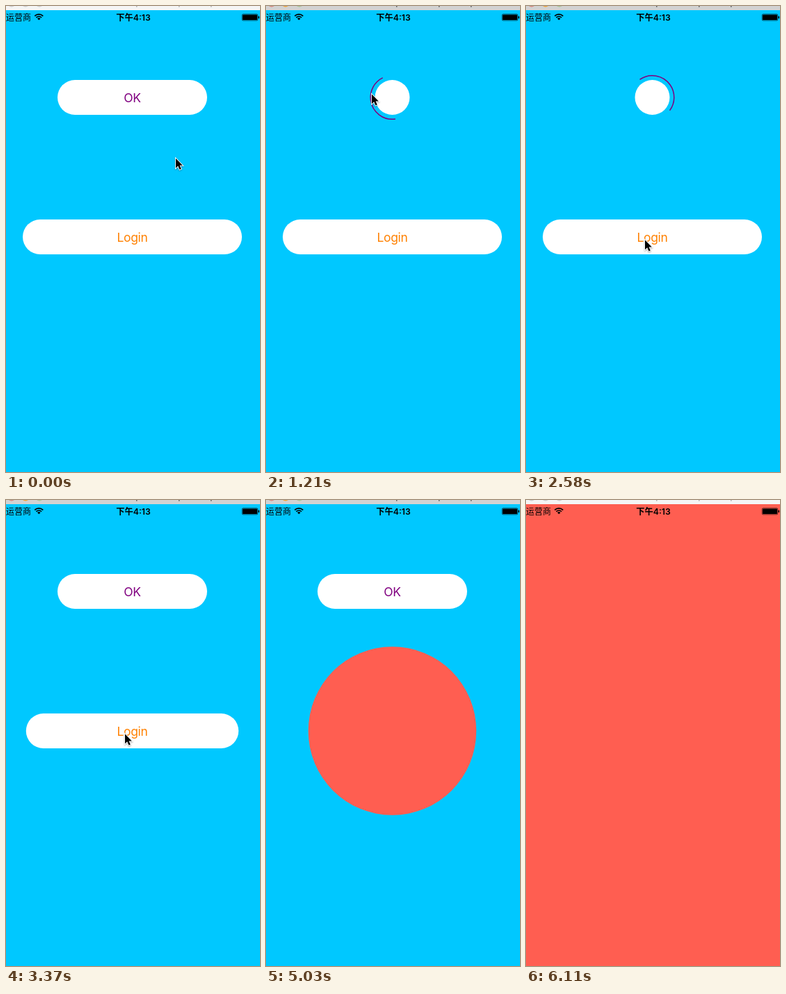
An HTML page with a canvas for the animation above (6140 ms loop, 365 px wide and 668 px high).

```html
<!DOCTYPE html>
<html lang="zh">
<head>
<meta charset="utf-8">
<title>Button transition</title>
<style>
html, body { margin: 0; width: 100%; height: 100%; overflow: hidden; background: #00c8ff; }
canvas { display: block; width: 365px; height: 668px; }
</style>
</head>
<body>
<canvas id="stage"></canvas>
<script>
const W = 365, H = 668, LOOP = 6140, CX = 181.5, BAR = 6;
const SKY = '#00c8ff', RED = '#ff5e51';
const FONT = 'Inter, "Noto Sans CJK SC", "Noto Sans CJK", sans-serif';

const canvas = document.getElementById('stage');
const ctx = canvas.getContext('2d');
const dpr = window.devicePixelRatio || 1;
canvas.width = W * dpr;
canvas.height = H * dpr;

const clamp = v => Math.max(0, Math.min(1, v));
const progress = (t, from, to) => clamp((t - from) / (to - from));
const mix = (a, b, p) => a + (b - a) * p;
const smooth = p => p * p * (3 - 2 * p);

const buttons = [
  { label: 'OK', color: '#800080', y: 131, width: 215, tap: 914, spin: 1020, done: 2617, revert: true },
  { label: 'Login', color: '#ff8000', y: 331, width: 315, tap: 3367.4, spin: 3476, done: 4815, revert: false }
];

// Cursor stops: time, x, y
const trail = [
  [200, 244, 218], [430, 152, 126], [1400, 152, 126], [1790, 166, 294],
  [2030, 171, 330], [2200, 171, 335], [3950, 171, 335], [4140, 222, 513],
  [4400, 236, 541], [4600, 237, 541], [4900, 250, 680]
];

function circle(x, y, r, color) {
  ctx.fillStyle = color;
  ctx.beginPath();
  ctx.arc(x, y, r, 0, Math.PI * 2);
  ctx.fill();
}

function pill(x, y, w, h, r, color) {
  ctx.fillStyle = color;
  ctx.beginPath();
  ctx.roundRect(x, y, w, h, r);
  ctx.fill();
}

function text(str, x, y, size, weight, color, align = 'center', spacing = 0) {
  ctx.font = `${weight} ${size}px ${FONT}`;
  ctx.letterSpacing = spacing + 'px';
  ctx.textAlign = align;
  ctx.fillStyle = color;
  ctx.fillText(str, x, y);
}

function drawButton(b, t) {
  let open = 1 - progress(t, b.tap, b.tap + 100);
  let alpha = 1 - progress(t, b.tap + 20, b.tap + 140);
  if (b.revert && t >= b.done) {
    open = progress(t, b.done, b.done + 100);
    alpha = progress(t, b.done + 70, b.done + 260);
  }
  const w = mix(50, b.width, open);
  pill(CX - w / 2, b.y - 25, w, 50, 25, '#fff');

  ctx.globalAlpha = alpha;
  text(b.label, CX, b.y + 6.5, 17.5, 400, b.color, 'center', -0.3);
  ctx.globalAlpha = 1;

  if (t >= b.spin && t < b.done) {
    const a = -Math.PI / 2 + (t - b.spin) / 400 * Math.PI * 2;
    ctx.strokeStyle = b.color;
    ctx.lineWidth = 1.5;
    ctx.beginPath();
    ctx.arc(CX, b.y, 31.3, a, a + Math.PI * 0.9);
    ctx.stroke();
  }
}

function drawReveal(t) {
  if (t < 4830) return;
  const p = (Math.min(t, 5200) - 4830) / 314;
  circle(CX, 331, 25 + 365 * p ** 3, RED);
}

function drawTitleBar(active) {
  ctx.fillStyle = active ? '#d2d2d2' : '#f5f5f5';
  ctx.fillRect(0, 0, W, BAR);
  const lights = active ? ['#d98a80', '#f3a63a', '#a9c79a'] : ['#cfcfcf', '#cfcfcf', '#cfcfcf'];
  lights.forEach((c, i) => circle(8 + i * 20, -4.5, 6, c));
  ctx.fillStyle = active ? '#555' : '#aaa';
  for (const x of [187, 248, 294]) ctx.fillRect(x, 0, 1.5, 1.5);
}

function drawStatus() {
  text('运营商', 0, 20.5, 12, 400, '#000', 'left');
  text('下午4:13', 183, 20.5, 12.3, 600, '#000');

  // Wi-Fi fan
  const up = -Math.PI / 2, half = 0.8;
  ctx.strokeStyle = '#000';
  ctx.lineWidth = 1.7;
  for (const r of [8.4, 5.3]) {
    ctx.beginPath();
    ctx.arc(47.3, 20.3, r, up - half, up + half);
    ctx.stroke();
  }
  ctx.fillStyle = '#000';
  ctx.beginPath();
  ctx.moveTo(47.3, 20.3);
  ctx.arc(47.3, 20.3, 3.2, up - half, up + half);
  ctx.fill();

  // Battery
  ctx.lineWidth = 0.6;
  ctx.beginPath();
  ctx.roundRect(339.2, 11.7, 22.6, 9.2, 1.6);
  ctx.stroke();
  pill(340, 12.5, 21, 7.6, 0.8, '#000');
  pill(362.5, 14.6, 1.5, 3.4, 0.7, '#000');
}

function cursorAt(t) {
  if (t <= trail[0][0]) return trail[0].slice(1);
  for (let i = 1; i < trail.length; i++) {
    const a = trail[i - 1], b = trail[i];
    if (t <= b[0]) {
      const p = smooth(progress(t, a[0], b[0]));
      return [mix(a[1], b[1], p), mix(a[2], b[2], p)];
    }
  }
  return null;
}

function drawCursor(t) {
  const pos = cursorAt(t);
  if (!pos) return;
  ctx.save();
  ctx.translate(pos[0], pos[1]);
  const arrow = new Path2D('M0 .5V14.3L3.2 11.3L5.5 16.6L7.8 15.6L5.6 10.5H9.8Z');
  ctx.shadowColor = 'rgba(0,0,0,.35)';
  ctx.shadowBlur = 2 * dpr;
  ctx.shadowOffsetY = dpr;
  ctx.strokeStyle = '#fff';
  ctx.lineWidth = 1.8;
  ctx.stroke(arrow);
  ctx.shadowColor = 'transparent';
  ctx.fillStyle = '#000';
  ctx.fill(arrow);
  ctx.restore();
}

function draw(t) {
  ctx.setTransform(dpr, 0, 0, dpr, 0, 0);
  ctx.fillStyle = SKY;
  ctx.fillRect(0, 0, W, H);
  buttons.forEach(b => drawButton(b, t));
  drawReveal(t);
  drawTitleBar(t >= 760 && t < 6110);
  drawStatus();
  drawCursor(t);
}

const start = performance.now();
function tick() {
  draw((performance.now() - start) % LOOP);
  requestAnimationFrame(tick);
}
tick();
</script>
</body>
</html>
```
